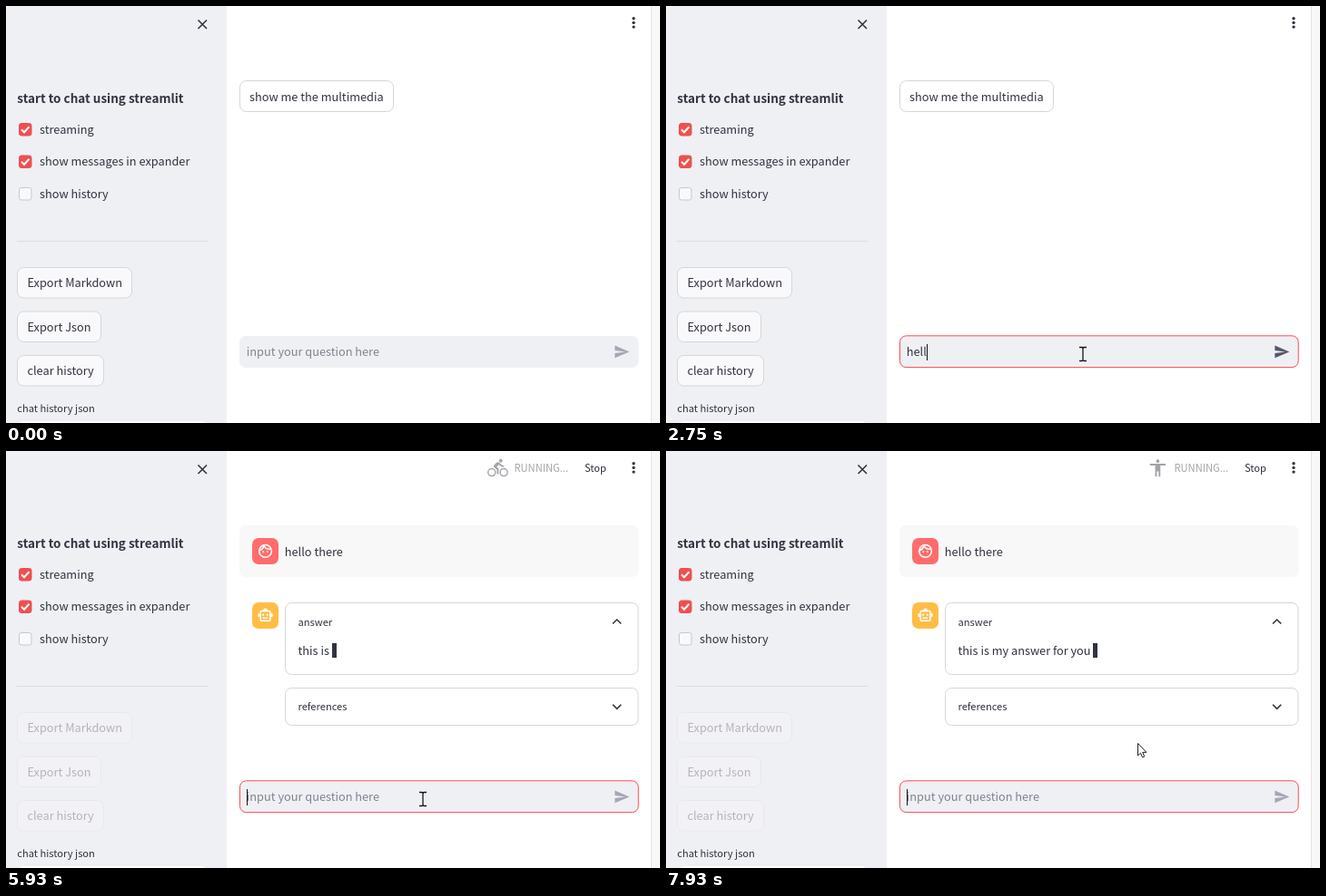
Recreate the animation shown at these times as an HTML page. Size 720 by 460 pixels, loop 7990 ms.

```html
<!DOCTYPE html>
<html lang="en">
<head>
<meta charset="utf-8">
<title>Chat demo</title>
<style>
html, body { margin: 0; width: 100%; height: 100%; overflow: hidden; background: #fff; }
svg { display: block; }
text { font: 12.76px "Noto Sans CJK SC", "Noto Sans CJK JP", "Noto Sans CJK", "Noto Sans", sans-serif; fill: #31333f; white-space: pre; }
.small { font-size: 11.15px; }
.head { font-size: 13.5px; font-weight: 600; }
.hint { fill: #80838f; }
.box { fill: #fff; stroke: #d6d6d9; }
.line { fill: none; stroke: #31333f; stroke-width: 1.6; }
.btn { fill: #f9f9fb; stroke: #d6d6d9; }
.white { fill: none; stroke: #fff; stroke-width: 2; }
</style>
</head>
<body>
<svg width="720" height="460" viewBox="0 0 720 460">
  <rect width="243" height="460" fill="#eff0f4"/>
  <rect x="710" width="10" height="460" fill="#f8f8f8"/>
  <path d="M710.5 0V460" stroke="#e4e4e4"/>
  <path class="line" d="M211.5 15.5l9.5 9.5m0-9.5l-9.5 9.5"/>
  <g fill="#31333f"><circle cx="691" cy="13.7" r="1.7"/><circle cx="691" cy="18.4" r="1.7"/><circle cx="691" cy="23.1" r="1.7"/></g>

  <text class="head" x="12.3" y="106.5">start to chat using streamlit</text>
  <g id="checks"></g>
  <path d="M12 259.5H223" stroke="#dcdde2"/>
  <g id="buttons"></g>
  <text class="small" x="12.3" y="448">chat history json</text>
  <rect x="13" y="458" width="209" height="20" rx="7" fill="#fff"/>

  <g id="suggestion">
    <rect class="box" x="257.5" y="82.5" width="169" height="34" rx="7"/>
    <text x="268" y="104.5">show me the multimedia</text>
  </g>

  <g id="status">
    <g transform="translate(530 7.4) scale(.95)" fill="#a3a4a9">
      <path class="sport" d="M13.49 5.48c1.1 0 2-.9 2-2s-.9-2-2-2-2 .9-2 2 .9 2 2 2zm-3.6 13.9l1-4.4 2.1 2v6h2v-7.5l-2.1-2 .6-3c1.3 1.5 3.3 2.5 5.5 2.5v-2c-1.9 0-3.5-1-4.3-2.4l-1-1.6c-.4-.6-1-1-1.7-1-.3 0-.5.1-.8.1l-5.2 2.2v4.7h2v-3.4l1.8-.7-1.6 8.1-4.9-1-.4 2 7 1.4z"/>
      <path class="sport" d="M12 2a2 2 0 0 1 0 4 2 2 0 0 1 0-4zm9 7h-6v13h-2v-6h-2v6H9V9H3V7h18z"/>
      <g class="sport">
        <circle cx="15.5" cy="3.5" r="2"/>
        <g fill="none" stroke="#a3a4a9" stroke-width="1.5"><circle cx="5" cy="17" r="4.25"/><circle cx="19" cy="17" r="4.25"/></g>
        <path d="M10.8 10.5l2.4-2.4.8.8c1.3 1.3 3 2.1 5.1 2.1V9c-1.5 0-2.7-.6-3.6-1.5l-1.9-1.9c-.9-.8-2.3-.8-3 0L7.8 8.4c-.8.8-.8 2.1 0 2.8L11 14v5h2v-6.2z"/>
      </g>
    </g>
    <text class="small" x="559.5" y="22.8" style="fill:#a3a4a9">RUNNING...</text>
    <text class="small" x="637" y="23">Stop</text>
  </g>

  <g id="question">
    <rect x="257" y="82" width="439.5" height="57" rx="7" fill="#f8f8f8"/>
    <rect x="271" y="96" width="29" height="29" rx="7" fill="#ff6c6c"/>
    <g transform="translate(276.4 101.3) scale(.76)">
      <circle class="white" cx="12" cy="12" r="9"/>
      <path class="white" d="M3.5 11C7 10 9 7.500 10 4.500C12 8 16 10 20.500 8.800"/>
      <g fill="#fff"><circle cx="9" cy="13" r="1.3"/><circle cx="15" cy="13" r="1.3"/></g>
    </g>
    <text x="306.800" y="115.500">hello there</text>
  </g>

  <g id="reply">
    <rect x="271" y="167" width="29" height="29" rx="7" fill="#ffbd45"/>
    <g transform="translate(276.400 172) scale(.76)" fill="#fff">
      <rect class="white" x="5" y="6" width="14" height="14" rx="1"/>
      <path d="M9 5a3 3 0 0 1 6 0v1H9zM4 9a3 3 0 0 0 0 6zM20 9a3 3 0 0 1 0 6zM8 15h8v2H8z"/>
      <circle cx="9" cy="11.500" r="1.500"/><circle cx="15" cy="11.500" r="1.500"/>
    </g>
    <rect class="box" x="307.500" y="167.500" width="388.500" height="79" rx="7"/>
    <rect class="box" x="307.500" y="261.500" width="388.500" height="41" rx="7"/>
    <text class="small" x="321.500" y="193">answer</text>
    <text class="small" x="321.500" y="286.300">references</text>
    <path class="line" d="M668 190.500l4.600-4.500 4.600 4.500M668 279.800l4.600 4.500 4.600-4.500"/>
    <text id="answer" x="321.500" y="225.300"></text>
    <rect id="block" y="212" width="5" height="16" fill="#31333f"/>
  </g>

  <rect x="257" y="364" width="439.500" height="35" rx="7" fill="#eff0f4"/>
  <rect id="focus" x="257.500" y="363.800" width="438.700" height="34.800" rx="7" fill="none" stroke="#ff4b4b"/>
  <text id="input" x="264.800" y="386"></text>
  <path id="send" transform="translate(668.800 372.300) scale(.76)" d="M2 21L23 12 2 3v7l15 2-15 2z"/>
  <rect id="caret" y="373" width="1" height="18" fill="#111"/>

  <g id="beam" fill="none">
    <path d="M-4 -7.500h3l1 1 1-1h3M0 -6.500V6.500M-4 7.500h3l1-1 1 1h3" stroke="#fff" stroke-width="2.500"/>
    <path d="M-4 -7.500h3l1 1 1-1h3M0 -6.500V6.500M-4 7.500h3l1-1 1 1h3" stroke="#111" stroke-width="1.300"/>
  </g>
  <path id="arrow" d="M.5 .5V14l3-2.800 2 4.800 2.200-1-2-4.600h4.200z" fill="#fff" stroke="#222"/>
</svg>
<script>
const LOOP = 7990;
const $ = id => document.getElementById(id);
const show = (el, on) => el.setAttribute('visibility', on ? 'visible' : 'hidden');
const clamp = v => Math.max(0, Math.min(1, v));

$('checks').innerHTML = ['streaming', 'show messages in expander', 'show history'].map((label, i) => {
  const y = 129.5 + i * 35.5, on = i < 2;
  return `<rect x="14.500" y="${y}" width="13.500" height="13.500" rx="2.500" fill="${on ? '#f04f50' : '#f9f9fb'}" stroke="${on ? '#f04f50' : '#c6c7ce'}"/>` +
    (on ? `<path class="white" d="M17 ${y + 6.8}l3 3 5.500-6"/>` : '') +
    `<text x="37" y="${y + 11.3}">${label}</text>`;
}).join('');

$('buttons').innerHTML = [['Export Markdown', 126], ['Export Json', 92], ['clear history', 95]].map(([label, w], i) => {
  const y = 288.5 + i * 48.5;
  return `<rect class="btn" x="12.500" y="${y}" width="${w}" height="33.500" rx="7"/><text x="23.500" y="${y + 21.5}">${label}</text>`;
}).join('');
const btnText = $('buttons').querySelectorAll('text');
const btnRect = $('buttons').querySelectorAll('rect');

const question = 'hello there';
const keyTimes = [1700, 2160, 2350, 2750, 2970, 3090, 3280, 3440, 3530, 3620, 3780];
const words = ['this', 'is', 'my', 'answer', 'for', 'you'];
const sports = document.querySelectorAll('.sport');
const sportOrder = [0, 1, 0, 1, 0, 1, 0, 2];

// Pointer path: time, x, y
const path = [[90, 597, 426], [220, 560, 416], [350, 500, 398], [480, 451, 385], [550, 448, 385], [640, 454, 388],
  [710, 454, 388], [890, 458, 384], [1110, 459, 384], [6700, 459, 384], [6920, 459, 376], [7060, 460, 361],
  [7370, 490, 340], [7680, 519, 322]];

function pointerAt(t) {
  const i = path.findIndex(p => p[0] > t);
  if (i < 0) return path[path.length - 1].slice(1);
  const [a, b] = [path[Math.max(0, i - 1)], path[i]];
  const k = clamp((t - a[0]) / (b[0] - a[0]));
  return [1, 2].map(j => a[j] + (b[j] - a[j]) * k);
}

function drawPointer(t) {
  const [x, y] = pointerAt(t);
  const inside = y > 364 && y < 399;
  show($('beam'), t >= 90 && inside);
  show($('arrow'), t >= 90 && !inside);
  for (const id of ['beam', 'arrow']) $(id).setAttribute('transform', `translate(${Math.round(x)} ${Math.round(y)})`);
}

function drawInput(t) {
  const sent = t >= 4210;
  const typed = sent ? '' : question.slice(0, keyTimes.filter(k => t >= k).length);
  const input = $('input');
  input.textContent = typed || 'input your question here';
  input.setAttribute('class', typed ? '' : 'hint');
  $('send').setAttribute('fill', typed ? '#555867' : '#a3a8b4');
  $('focus').setAttribute('opacity', t < 710 ? 0 : clamp(.5 + (t - 710) / 360));
  const blink = sent ? (t + 130) % 1000 < 500 : t >= 710 && (t < 1170 || t >= 1700);
  show($('caret'), blink);
  $('caret').setAttribute('x', Math.round(265 + (typed ? input.getComputedTextLength() - .5 : 0)));
}

function drawChat(t) {
  show($('suggestion'), t < 4370);
  show($('question'), t >= 4370);
  show($('status'), t >= 4290);
  const slot = sportOrder[Math.floor((t - 4880 + 1128) / 141) % 8];
  sports.forEach((el, i) => show(el, t >= 4290 && i === slot));

  const replying = t >= 4520;
  const count = clamp((t - 5420) / 2500 + .001) && Math.min(6, 1 + Math.floor((t - 5420) / 500));
  const answer = $('answer');
  answer.textContent = count > 0 ? words.slice(0, count).join(' ') + ' ' : 'thinking';
  show($('reply'), replying);
  show($('block'), replying && count > 0);
  $('block').setAttribute('x', Math.round(321.5 + answer.getComputedTextLength()));

  const fade = clamp((t - 5040) / 300);
  btnText.forEach(el => el.setAttribute('opacity', 1 - .68 * fade));
  btnRect.forEach(el => el.setAttribute('opacity', 1 - .7 * fade));
}

function draw(now) {
  const t = now % LOOP;
  drawInput(t);
  drawChat(t);
  drawPointer(t);
  requestAnimationFrame(draw);
}
requestAnimationFrame(draw);
</script>
</body>
</html>
```
